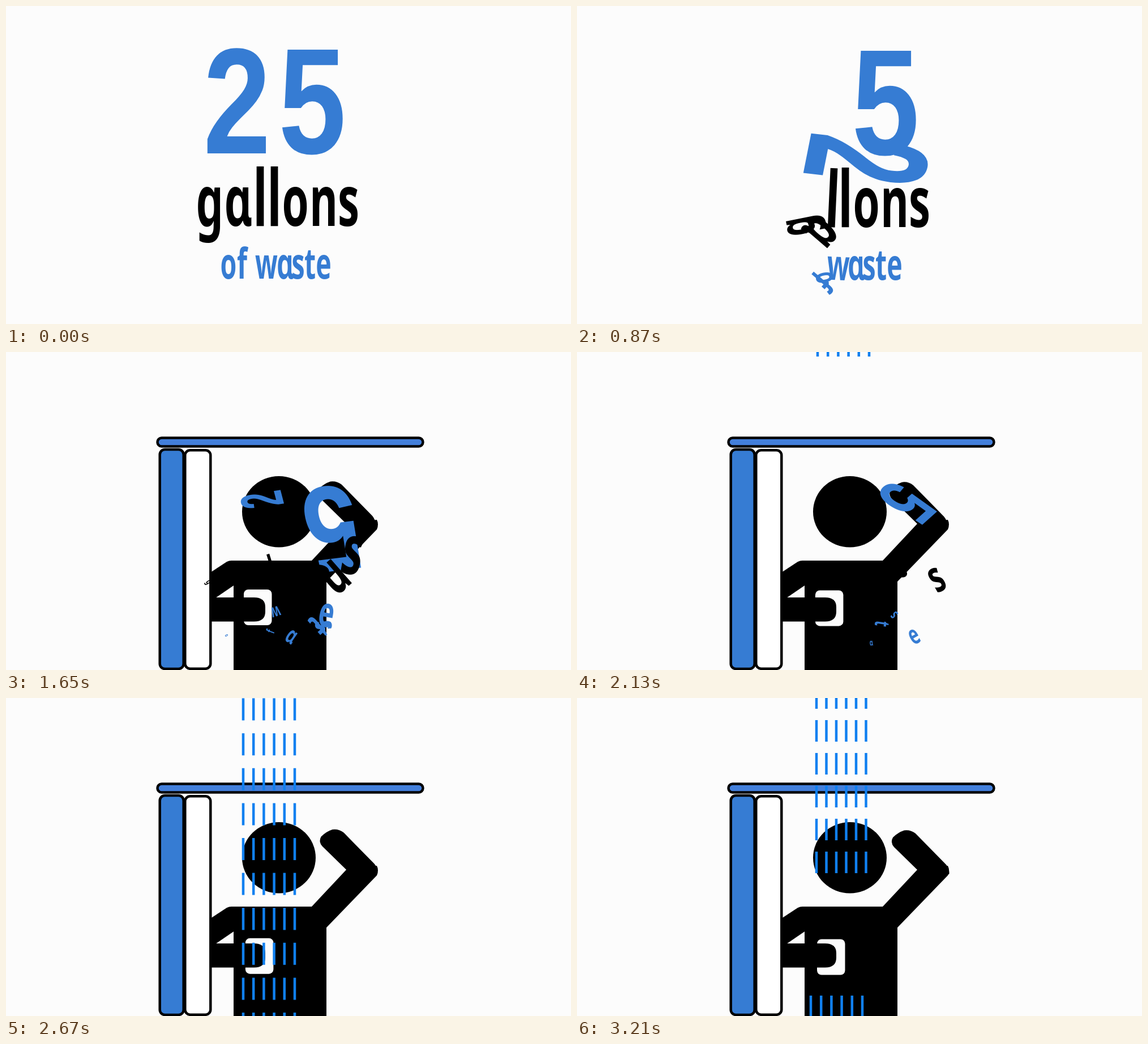
Recreate the animation shown at these times as an HTML page. Size 998 by 561 pixels, loop 3240 ms.

```html
<!DOCTYPE html>
<html lang="en">
<head>
<meta charset="utf-8">
<title>25 gallons of waste</title>
<style>
  html, body { margin: 0; width: 100%; height: 100%; overflow: hidden; background: #fcfcfc; }
  svg { display: block; width: 998px; height: 561px; }
  text { font-weight: 700; text-anchor: middle; }
  .panel { stroke: #000; stroke-width: 4.5; }
</style>
</head>
<body>
<svg viewBox="0 0 998 561" role="img" aria-label="25 gallons of waste">
  <g id="scene" visibility="hidden">
    <rect class="panel" x="267.5" y="151.5" width="469" height="15" rx="7.5" fill="#437fdb"/>
    <path d="M402 368H566V561H402Z"/>
    <path d="M404 368H398Q394 368 390 370L361 389V440L402 412Z"/>
    <ellipse cx="482" cy="281.7" rx="65" ry="62.8"/>
    <path d="M540 368L601 303L655 296Q659 304 655 313L566 405Z"/>
    <path id="hand" d="M601 303L559 262Q552 254 557 245Q566 236 577 232.500Q588 231 597 238L651 293Q657 300 656.500 309L630 332Z"/>
    <rect id="soap" x="420" y="419" width="49.500" height="63" rx="8" fill="#fcfcfc"/>
    <path d="M361 433H438Q458 433 458 450V458Q458 475.500 438 475.500H361Z"/>
    <rect class="panel" x="271.700" y="172" width="42" height="387" rx="9" fill="#367cd3"/>
    <rect class="panel" x="316.300" y="173.300" width="45" height="385.500" rx="9" fill="#fff"/>
  </g>
  <g id="words"></g>
  <g id="rain" stroke="#1080f0" stroke-width="4.5"></g>
</svg>
<script>
const LOOP = 3240, STEP = 30;
const SCENE_IN = 1500, WORDS_OUT = 2500;
const CONDENSE = 0.62;          // narrow cut of the typeface
const SPIN = 2 / 3;             // degrees per ms
const LIFE = 1340;              // ms from full size to nothing
const BLUE = '#367cd3';
const SANS = '"Noto Sans", "Open Sans", sans-serif';

const $ = id => document.getElementById(id);
const clamp = v => Math.min(1, Math.max(0, v));
const show = (el, on) => el.setAttribute('visibility', on ? 'visible' : 'hidden');

function add(parent, tag, attrs) {
  const el = document.createElementNS('http://www.w3.org/2000/svg', tag);
  for (const key in attrs) el.setAttribute(key, attrs[key]);
  return parent.appendChild(el);
}

const rows = [
  { text: '25', xs: [408, 541], y: 260, size: 266, wide: 1.3, nudge: 4, fill: BLUE,
    font: '"Liberation Sans", Arial, sans-serif' },
  { text: 'gɑllons', xs: [360, 410, 449, 474, 511, 561, 605], y: 388, size: 123, wide: 1, nudge: 0, fill: '#000', font: SANS },
  { text: 'ofwɑste', xs: [393, 417, 460, 493, 516, 537, 561], y: 481, size: 75, wide: 1, nudge: 0, fill: BLUE, font: SANS }
];

// Letters leave one after another, evenly spread over each row.
const letters = rows.flatMap(row => [...row.text].map((char, i) => {
  const el = add($('words'), 'text', {
    fill: row.fill, 'font-family': row.font,
    'font-size': char === 'l' ? row.size * 1.12 : row.size
  });
  el.textContent = char;
  return { el, row, x: row.xs[i], start: 386 + 1344 * (i + 0.5) / row.text.length };
}));

function moveLetter({ el, row, x, start }, t) {
  const age = Math.max(0, t - start);
  const scale = 1 - age / LIFE;
  const visible = scale > 0.06 && t < WORDS_OUT;
  show(el, visible);
  if (!visible) return;
  const turn = age * SPIN, rad = turn * Math.PI / 180;
  const drift = Math.min(1, age / 380), settle = clamp(t / 300);
  const dx = drift * (24 - 35 * Math.sin(rad));
  const dy = drift * 35 * Math.cos(rad);
  el.setAttribute('transform',
    `translate(${x + row.nudge * settle} ${row.y + 2 * settle}) scale(${row.wide} 1) ` +
    `translate(${dx} ${dy}) rotate(${turn}) scale(${scale * CONDENSE} ${scale})`);
}

// Each shower is a block of dashes; top and x belong to its leading row at the given time.
const showers = [
  { at: 2670, top: 555, x: 419, gap: 18.2, pitch: 61.6, count: 11, dash: 39 },
  { at: 3210, top: 271, x: 423, gap: 17.5, pitch: 58, count: 6, dash: 38 }
];
for (const s of showers) {
  s.el = add($('rain'), 'g', {});
  let d = '';
  for (let r = 0; r < s.count; r++)
    for (let c = 0; c < 6; c++) d += `M${c * s.gap} ${-r * s.pitch}v${s.dash}`;
  add(s.el, 'path', { d });
}

const begin = performance.now();

function draw() {
  const t = Math.floor(((performance.now() - begin) % LOOP) / STEP) * STEP;
  letters.forEach(letter => moveLetter(letter, t));

  show($('scene'), t >= SCENE_IN);
  const p = clamp((t - 1650) / 1560), u = p * p * (3 - 2 * p);
  $('soap').setAttribute('transform', `translate(${4 * u} ${6.5 * u})`);
  $('hand').setAttribute('transform', `translate(${5 * u - 4} ${5 * u - 4})`);

  for (const s of showers) {
    const dt = t - s.at;
    s.el.setAttribute('transform', `translate(${s.x - dt / 90} ${s.top + dt * 1.085})`);
  }
  requestAnimationFrame(draw);
}
draw();
</script>
</body>
</html>
```
